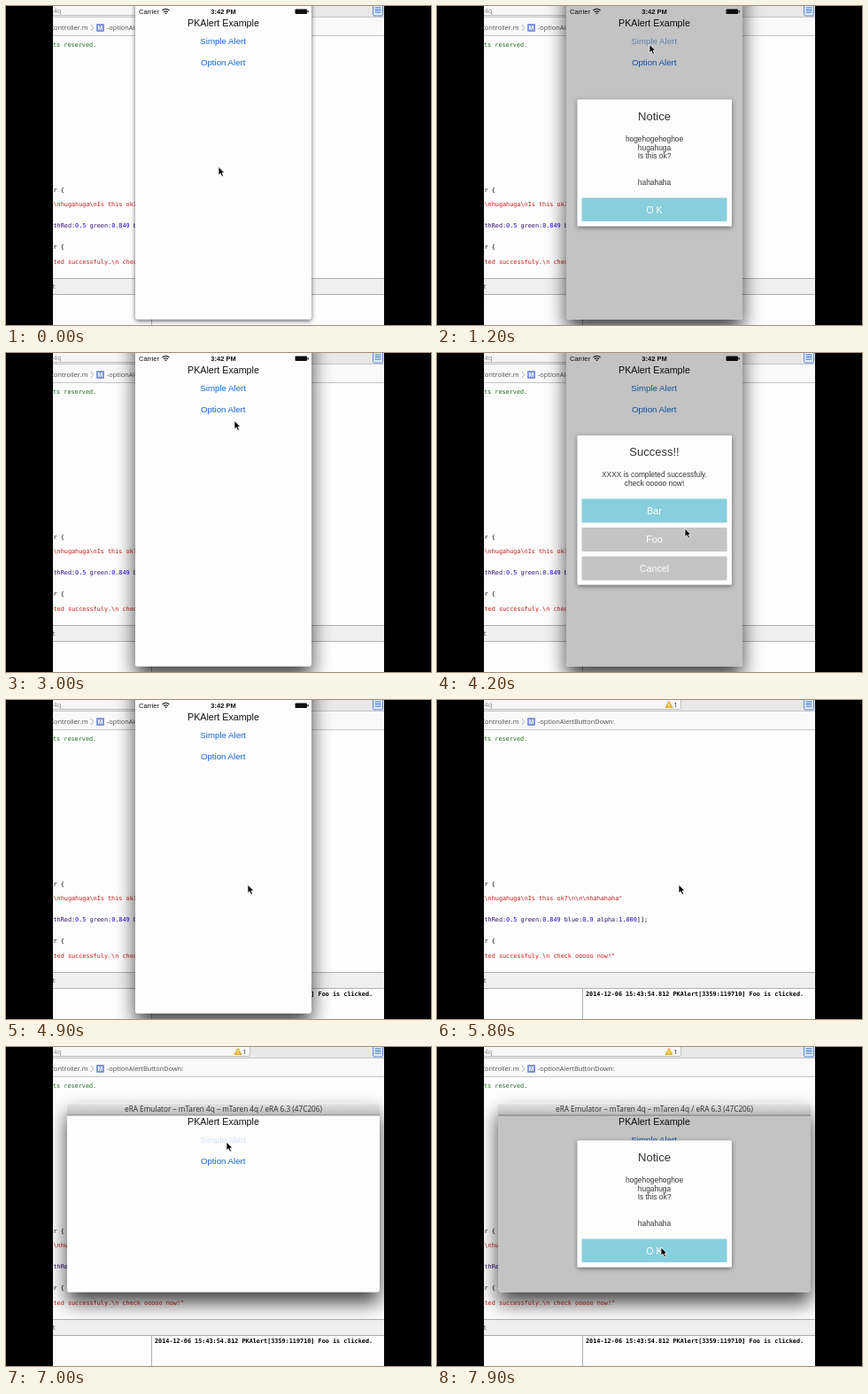
Recreate the animation shown at these times as an HTML page. Size 480 px wide and 360 px high, loop 8 s.

```html
<!DOCTYPE html>
<html lang="en">
<head>
<meta charset="utf-8">
<title>Alert demo</title>
<style>
  html, body { margin: 0; width: 100%; height: 100%; overflow: hidden; background: #000; }
  svg { display: block; width: 480px; height: 360px; }
  text { white-space: pre; font-family: "Liberation Sans", Arial, sans-serif; }
  .code text { font: 6.82px "DejaVu Sans Mono", monospace; }
  .code .log { font-weight: bold; }
  .ui { font: 7.35px "Open Sans", "Noto Sans", sans-serif; fill: #4c4c4c; }
  .str { fill: #c41a16; }
  .num { fill: #1c00cf; }
  .mid { text-anchor: middle; }
  .head { font-size: 10.7px; fill: #111; }
  .link { font-size: 9.7px; fill: #1566cf; }
  .title { font-size: 13px; fill: #333; }
  .body { font-size: 8.4px; fill: #333; }
  .btn { font-size: 10.7px; fill: #fff; }
  .status { font-size: 7.5px; fill: #111; }
</style>
</head>
<body>
<svg viewBox="0 0 480 360">
  <defs>
    <clipPath id="view"><rect x="53" width="374" height="360"/></clipPath>
    <clipPath id="wideClip"><rect x="69" y="77" width="353" height="199.500"/></clipPath>
    <filter id="activeShadow" filterUnits="userSpaceOnUse" x="0" y="-100" width="480" height="560">
      <feDropShadow dx="0" dy="12" stdDeviation="11" flood-color="#000" flood-opacity=".75"/>
    </filter>
    <filter id="idleShadow" filterUnits="userSpaceOnUse" x="0" y="-100" width="480" height="560">
      <feDropShadow dx="0" dy="2" stdDeviation="2.500" flood-color="#000" flood-opacity=".6"/>
    </filter>
    <filter id="boxShadow" filterUnits="userSpaceOnUse" x="140" y="70" width="210" height="220">
      <feDropShadow dx="0" dy="1.500" stdDeviation="2.500" flood-color="#000" flood-opacity=".5"/>
    </filter>
    <linearGradient id="bar" x2="0" y2="1">
      <stop stop-color="#e6e6e6"/><stop offset="1" stop-color="#b8b8b8"/>
    </linearGradient>
    <g id="screen">
      <text class="head mid" x="245.500" y="22.500">PKAlert Example</text>
      <text class="link mid" x="245.200" y="43">Simple Alert</text>
      <text class="link mid" x="245.200" y="66.500">Option Alert</text>
    </g>
  </defs>

  <rect width="480" height="360"/>
  <g clip-path="url(#view)">
    <rect x="53" width="374" height="360" fill="#fdfdfd"/>

    <!-- editor -->
    <rect x="53" width="374" height="13" fill="#e8e8e8"/>
    <rect x="40" y="-10" width="235.500" height="20.500" rx="2" fill="#f6f6f6" stroke="#b4b4b4" stroke-width=".8"/>
    <text class="ui" x="53.500" y="7.500" style="fill:#888">4q</text>
    <path d="M262 1.500L266 8.500H258Z" fill="#f5bd2c" stroke="#d99a1c" stroke-width=".8" stroke-linejoin="round"/>
    <path d="M262 3.800V6M262 7V7.800" stroke="#fff" stroke-width=".9"/>
    <text class="ui" x="267.500" y="8" style="fill:#222">1</text>
    <rect x="414.500" y="-3" width="11" height="14" rx="1.500" fill="#dfe9fa" stroke="#5f8ad0"/>
    <path d="M416.500 2H423.500M416.500 4.500H423.500M416.500 7H423.500" stroke="#2f6fd0"/>
    <rect x="53" y="13" width="374" height="20" fill="#f9f9f9"/>
    <path d="M53 12.500H427M53 33.500H427" stroke="#c6c6c6"/>
    <text class="ui" x="92.500" y="27" text-anchor="end">Controller.m</text>
    <path d="M96 21L98.500 24.500L96 28" fill="none" stroke="#999" stroke-width=".8"/>
    <rect x="102" y="20" width="9" height="9" rx="1" fill="#7d96d6"/>
    <text class="mid" x="106.500" y="27.200" font-size="7" font-weight="bold" fill="#fff">M</text>
    <text class="ui" x="114" y="27">-optionAlertButtonDown:</text>

    <g class="code">
      <text x="53" y="45.500" fill="#1d6b1d">ts reserved.</text>
      <text x="53.500" y="210">r {</text>
      <text class="str" x="53.500" y="226">\nhugahuga\nIs this ok?\n\n\nhahahaha"</text>
      <text x="53.500" y="250" fill="#2e0d6e">thRed:<tspan class="num">0.5</tspan> green:<tspan class="num">0.849</tspan> blue:<tspan class="num">0.9</tspan> alpha:<tspan class="num">1.000</tspan><tspan fill="#000">]];</tspan></text>
      <text x="53.500" y="274">r {</text>
      <text class="str" x="53.500" y="291">ted successfuly.\n check ooooo now!"</text>
      <rect x="53" y="307" width="374" height="18" fill="#efefef"/>
      <path d="M53 307.500H427M53 325.500H427M164.500 325V360" stroke="#b0b0b0"/>
      <text class="ui" x="52" y="319">t</text>
      <text class="log" id="log" x="168" y="334">2014-12-06 15:43:54.812 PKAlert[3359:119710] Foo is clicked.</text>
    </g>

    <!-- portrait window -->
    <g id="tall">
      <rect id="tallFrame" x="146" y="-90" width="199" height="443.500" rx="3" fill="#fdfdfd"/>
      <g id="tallScreen"></g>
      <text class="status" x="150" y="9">Carrier</text>
      <g fill="none" stroke="#111" stroke-width="1.100">
        <path d="M176.500 5Q180.500 1.500 184.500 5M178 6.800Q180.500 4.600 183 6.800"/>
        <path d="M179.700 8.300H181.300" stroke-width="1.500"/>
      </g>
      <text class="status mid" x="245.500" y="9" font-weight="bold">3:42 PM</text>
      <rect x="326.500" y="3.500" width="13.500" height="5.500" rx="1" fill="#111"/>
      <rect x="340.500" y="5" width="1.200" height="2.500" fill="#111"/>
      <rect class="dim" x="146" y="-90" width="199" height="443.500" rx="3"/>
    </g>

    <!-- landscape window -->
    <g id="wide">
      <rect x="69" y="63.500" width="353" height="213" rx="3" fill="#fdfdfd" filter="url(#activeShadow)"/>
      <path d="M69 77V67Q69 63.500 72.500 63.500H418.500Q422 63.500 422 67V77Z" fill="url(#bar)"/>
      <path d="M69 77H422" stroke="#777" stroke-width=".8"/>
      <text class="ui mid" x="245.500" y="73.200" style="font-size:8.250px;fill:#2c2c2c">eRA Emulator – mTaren 4q – mTaren 4q / eRA 6.3 (47C206)</text>
      <g clip-path="url(#wideClip)">
        <g id="wideScreen" transform="translate(0 65)"></g>
        <rect class="dim" x="69" y="77" width="353" height="200"/>
      </g>
    </g>

    <g id="notice"></g>
    <g id="success"></g>

    <path id="cursor" d="M0 0V9.500L2.200 7.500L3.800 11L5.600 10.200L4 6.900H6.800Z" stroke="#fff" stroke-width=".8" stroke-linejoin="round"/>
  </g>
</svg>

<script>
const LOOP = 8000;
const $ = id => document.getElementById(id);
const clamp = x => Math.min(1, Math.max(0, x));
const ease = x => x * x * (3 - 2 * x);
const ramp = (t, from, to) => ease(clamp((t - from) / (to - from)));

// [ms, x, y] of the pointer tip
const pointer = [
  [0, 240, 181.4], [200, 240, 181.4], [850, 240, 43.4], [1450, 240, 43.4],
  [2000, 248, 226.4], [2350, 248, 226.4], [3000, 258, 76.4], [3300, 254, 64.4],
  [3600, 254, 64.4], [4200, 280, 198], [4450, 273, 208.4], [5900, 273, 208.4],
  [6800, 249, 107.2], [7200, 249, 107.2], [7800, 253, 226], [LOOP, 253, 226]
];

// Fade in from..to, fade out from..to
const noticeTimes = [[950, 1150, 2350, 2600], [7080, 7300, 9000, 9100]];
const successTimes = [[3400, 3620, 4600, 4850]];
const simplePresses = [900, 6880];
const optionPresses = [3350];

const label = (cls, y, text) => `<text class="${cls} mid" x="245.5" y="${y}">${text}</text>`;
const button = (y, h, color, text) =>
  `<rect x="163.5" y="${y}" width="164" height="${h}" rx="1" fill="${color}"/>` +
  label("btn", y + h / 2 + 3.8, text);

function buildAlert(id, top, bottom, parts) {
  $(id).innerHTML =
    `<rect x="158.5" y="${top}" width="174.5" height="${bottom - top}" rx="1.5" fill="#fdfdfd" filter="url(#boxShadow)"/>` +
    parts.join("");
}

buildAlert("notice", 105.5, 248.5, [
  label("title", 129, "Notice"),
  label("body", 153, "hogehogehoghoe"),
  label("body", 162.7, "hugahuga"),
  label("body", 172.4, "Is this ok?"),
  label("body", 201.5, "hahahaha"),
  button(216.5, 26.5, "#88cfdd", "O K")
]);
buildAlert("success", 93, 261.5, [
  label("title", 116, "Success!!"),
  label("body", 140, "XXXX is completed successfuly."),
  label("body", 149.7, "check ooooo now!"),
  button(164.5, 27, "#88cfdd", "Bar"),
  button(197, 27, "#c4c4c4", "Foo"),
  button(229.5, 27, "#c4c4c4", "Cancel")
]);

for (const id of ["tallScreen", "wideScreen"]) $(id).innerHTML = $("screen").innerHTML;
const links = ["tallScreen", "wideScreen"].map(id => $(id).querySelectorAll(".link"));
const dims = document.querySelectorAll(".dim");

const level = (t, times) =>
  Math.max(...times.map(([a, b, c, d]) => ramp(t, a, b) * (1 - ramp(t, c, d))));

// A pressed link turns pale, then recovers
function linkAlpha(t, presses) {
  const last = presses.filter(p => p <= t).pop();
  return last === undefined ? 1 : 0.18 + 0.82 * clamp((t - last - 150) / 330);
}

function pointerAt(t) {
  const i = pointer.findIndex(k => k[0] > t);
  const [t0, x0, y0] = pointer[i - 1], [t1, x1, y1] = pointer[i];
  const k = ramp(t, t0, t1);
  return [x0 + (x1 - x0) * k, y0 + (y1 - y0) * k];
}

function show(id, on) { $(id).style.display = on ? "" : "none"; }

function showAlert(id, amount) {
  const s = 0.9 + 0.1 * amount;
  show(id, amount > 0);
  $(id).setAttribute("opacity", amount);
  $(id).setAttribute("transform", `translate(245.5 177) scale(${s}) translate(-245.5 -177)`);
}

function render(t) {
  const notice = level(t, noticeTimes), success = level(t, successTimes);
  show("tall", t < 5700);
  show("wide", t >= 6200);
  show("log", t >= 4700);
  // The window gains focus on the first click
  $("tallFrame").setAttribute("filter", `url(#${t < simplePresses[0] ? "idle" : "active"}Shadow)`);
  showAlert("notice", notice);
  showAlert("success", success);
  dims.forEach(d => d.setAttribute("fill-opacity", 0.23 * Math.max(notice, success)));
  for (const [simple, option] of links) {
    simple.setAttribute("opacity", linkAlpha(t, simplePresses));
    option.setAttribute("opacity", linkAlpha(t, optionPresses));
  }
  $("cursor").setAttribute("transform", `translate(${pointerAt(t).join(" ")})`);
}

const start = performance.now();
function tick() {
  render((performance.now() - start) % LOOP);
  requestAnimationFrame(tick);
}
tick();
</script>
</body>
</html>
```
